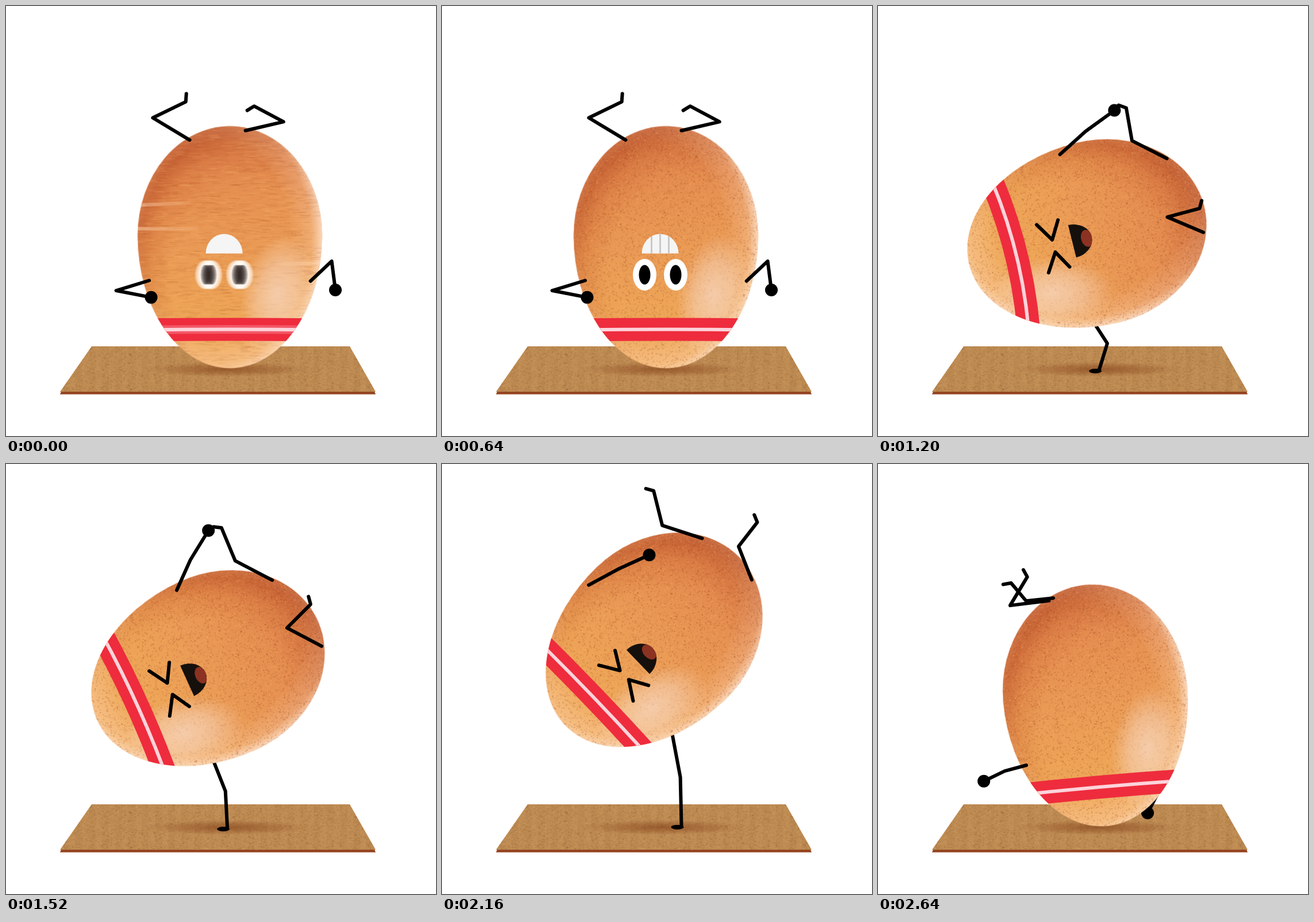
Animation of 748x748 px, one loop 2.72 s. Source, as an HTML page with a canvas:

```html
<!DOCTYPE html>
<html>
<head>
<meta charset="utf-8">
<style>
html, body { margin: 0; width: 100%; height: 100%; overflow: hidden; background: #fff; }
canvas { display: block; }
</style>
</head>
<body>
<canvas id="stage" width="748" height="748"></canvas>
<script>
const SIZE = 748, LOOP = 2720, STEP = 80, SPIN = 320, TAU = Math.PI * 2, DEG = TAU / 360;
const ctx = document.getElementById('stage').getContext('2d');

let seed = 7;
const rnd = () => (seed = seed * 16807 % 2147483647) / 2147483647;
const lerp = (a, b, p) => a + (b - a) * p;
const mixList = (a, b, p) => a.map((v, i) => lerp(v, b[i], p));
const mixAngle = (a, b, p) => a + (((b - a + 540) % 360 + 360) % 360 - 180) * p;

// ---- Cached artwork ----

function layer(w, h, paint) {
  const canvas = document.createElement('canvas');
  canvas.width = w;
  canvas.height = h;
  paint(canvas.getContext('2d'));
  return canvas;
}

function gradient(g, stops) {
  stops.forEach(([at, color]) => g.addColorStop(at, color));
  return g;
}

// The egg is two half ellipses that meet at WAIST; its pointed end is down.
const WAIST = -20, WIDE = 160.5, BLUNT = 190.5, POINTED = 230.5;
const edgeX = y => WIDE * Math.sqrt(1 - ((y - WAIST) / (y < WAIST ? BLUNT : POINTED)) ** 2);
const topY = x => WAIST - BLUNT * Math.sqrt(1 - (x / WIDE) ** 2);

function eggPath(c) {
  c.beginPath();
  c.ellipse(0, WAIST, WIDE, BLUNT, 0, Math.PI, TAU);
  c.ellipse(0, WAIST, WIDE, POINTED, 0, 0, Math.PI);
}

function dots(c, count, x, y, w, h, dw, dh, colors) {
  for (let i = 0; i < count; i++) {
    c.fillStyle = colors[i % colors.length];
    c.fillRect(x + rnd() * w, y + rnd() * h, dw * (.6 + rnd() * .8), dh * (.6 + rnd() * .8));
  }
}

// Spinning smears the speckles sideways.
const makeEgg = spinning => layer(340, 440, c => {
  c.translate(170, 220);
  eggPath(c);
  c.clip();
  const fill = style => { c.fillStyle = style; c.fillRect(-170, -220, 340, 440); };
  fill(gradient(c.createLinearGradient(-20, -211, 20, 211), [
    [0, '#d47846'], [.2, '#e48c50'], [.5, '#ea9a55'], [.8, '#eea657'], [1, '#f2b26c']]));
  c.save();
  c.scale(160, 211);
  fill(gradient(c.createRadialGradient(.2, .25, 0, .2, .25, 1.25), [
    [.66, 'rgba(190,80,35,0)'], [.85, 'rgba(190,80,35,.2)'], [1, 'rgba(175,65,30,.48)']]));
  fill(gradient(c.createRadialGradient(-.14, -.06, 0, -.14, -.06, 1.14), [
    [.7, 'rgba(255,220,190,0)'], [.9, 'rgba(255,220,190,.28)'], [1, 'rgba(255,235,220,.75)']]));
  c.restore();
  if (spinning)
    dots(c, 3200, -170, -212, 330, 424, 15, 1.5, ['rgba(165,75,30,.12)', 'rgba(255,195,115,.12)']);
  else
    dots(c, 11000, -165, -212, 330, 424, 1.6, 1.6, ['rgba(160,70,30,.34)', 'rgba(255,195,110,.24)']);
  c.translate(82, 82);
  c.rotate(.22);
  c.scale(62, 108);
  fill(gradient(c.createRadialGradient(0, 0, 0, 0, 0, 1), [
    [0, 'rgba(248,218,198,.75)'], [.5, 'rgba(248,216,194,.5)'], [1, 'rgba(250,215,190,0)']]));
});

const board = layer(SIZE, SIZE, c => {
  const shape = (color, ...pts) => {
    c.fillStyle = color;
    c.beginPath();
    pts.forEach(p => c.lineTo(...p));
    c.closePath();
    c.fill();
  };
  shape('#94431f', [97, 668], [94, 675.5], [643, 675.5], [640, 668]);
  shape('#bb8850', [149, 592], [598, 592], [643, 671], [94, 671]);
  c.globalCompositeOperation = 'source-atop';
  for (let x = 110; x < 640; x += 23) {
    c.fillStyle = 'rgba(225,175,110,.1)';
    c.fillRect(x, 592, 11, 78);
  }
  dots(c, 6000, 94, 592, 549, 78, 2.5, 1.5, ['rgba(110,60,20,.12)', 'rgba(225,175,115,.14)']);
  c.translate(385, 632);
  c.scale(140, 13);
  c.fillStyle = gradient(c.createRadialGradient(0, 0, 0, 0, 0, 1), [
    [0, 'rgba(125,58,20,.6)'], [.5, 'rgba(130,62,22,.35)'], [1, 'rgba(130,62,22,0)']]);
  c.fillRect(-1, -1, 2, 2);
});

const shell = makeEgg(false), spinShell = makeEgg(true);

// ---- Poses ----
// A swinging limb has a root on the egg's outline, two screen angles and a reach.
const limb = (root, upper, lower, reach = 1) => ({ root, upper, lower, reach });
// The other arm follows its hand: shoulder height, hand x and y, elbow bow.
const FLOOR = [385, 632];

const spinA = {
  body: [389.5, 419.5, 0], face: [-10, 11, 1], bend: 1,
  legs: [limb(-70, -149, -26, 1.1), limb(27, -13, -152)],
  arm: limb(58, 163, 11), prop: [59, 573, 494, 45],
};
const spinB = {
  body: [389.5, 419.5, 0], face: [-38, 31, 1.7], bend: -4,
  legs: [limb(-67, -165, -15, 1.2), limb(16, 8, -142, .8)],
  arm: limb(3, 163, 99, .8), prop: [3, 618, 462, 0],
};
const kick = {
  body: [366, 358, 81], face: [4, 18, 1], bend: 9,
  legs: [limb(-95, -51, 95), limb(46, 40, 34, .55)],
  arm: limb(71, -61, 0, .82), prop: [21, ...FLOOR, 11],
};
const crouch = {
  body: [363, 399, 76], face: [4, 27, 1], bend: 17,
  legs: [limb(-96, -153, -100), limb(44, -157, -15)],
  arm: limb(11, -42, -36), prop: [26, ...FLOOR, 20],
};
const stretch = {
  body: [345, 342, 61], face: [1, 45, 1], bend: 4,
  legs: [limb(-96, -152, -118, 1.1), limb(44, -150, -58)],
  arm: limb(-18, -76, -68, .95), prop: [68, ...FLOOR, 6],
};
const land = {
  body: [421, 421, 8], face: [27, 37, 1], bend: 0,
  legs: [limb(-2, -188, -68), limb(36, -12, -37, .7)],
  arm: limb(90, 95, 88), prop: [120, 498, 620, 9],
};
const wind = {
  body: [379.5, 420, -5], face: [-10, 20, 1], bend: 2,
  legs: [limb(-58, -186, -130, .7), limb(-66, -187, -59)],
  arm: limb(93, 165, 154, .65), prop: [150, 469, 607, 0],
};

const mixLimb = (a, b, p) => limb(lerp(a.root, b.root, p),
  mixAngle(a.upper, b.upper, p), mixAngle(a.lower, b.lower, p), lerp(a.reach, b.reach, p));

const mix = (a, b, p) => ({
  body: mixList(a.body, b.body, p),
  face: mixList(a.face, b.face, p),
  bend: lerp(a.bend, b.bend, p),
  legs: a.legs.map((leg, i) => mixLimb(leg, b.legs[i], p)),
  arm: mixLimb(a.arm, b.arm, p),
  prop: mixList(a.prop, b.prop, p),
});

const held = mix(crouch, stretch, .7);
const keys = [[0, spinA], [SPIN, spinB], [640, spinA], [880, kick], [1200, crouch], [1520, held],
  [1840, held], [1920, stretch], [2320, land], [2640, wind], [LOOP, spinA]];

function poseAt(t) {
  const i = keys.findIndex(k => k[0] > t) - 1;
  const [start, from] = keys[i], [stop, to] = keys[i + 1];
  const p = (t - start) / (stop - start), arc = Math.sin(p * Math.PI);
  const pose = mix(from, to, start === 1920 ? p ** 2.5 : p * p * (3 - 2 * p));
  if (start === 640 || start === 1920) pose.body[1] -= 58 * arc;
  if (t < 880) pose.legs.forEach(leg => leg.reach *= 1 + .8 * arc ** 2);
  return pose;
}

function toWorld([x, y], [cx, cy, tilt]) {
  const c = Math.cos(tilt * DEG), s = Math.sin(tilt * DEG);
  return [cx + x * c - y * s, cy + x * s + y * c];
}

// Joint positions from a start point and a list of [angle, length].
function chain(start, ...bones) {
  const pts = [start];
  bones.forEach(([angle, length]) => {
    const [x, y] = pts[pts.length - 1];
    pts.push([x + length * Math.cos(angle * DEG), y + length * Math.sin(angle * DEG)]);
  });
  return pts;
}

const shoulder = (side, y, body) => toWorld([side * .93 * edgeX(y), y], body);

const legPoints = ({ root, upper, lower, reach }, body) =>
  chain(toWorld([root, topY(root) + 5], body), [upper, 68 * reach], [lower, 58 * reach], [lower - 60, 14]);

const armPoints = ({ root, upper, lower, reach }, body) =>
  chain(shoulder(-1, root, body), [upper, 60 * reach], [lower, 62 * reach]);

function propPoints([root, x, y, bow], body) {
  const [sx, sy] = shoulder(1, root, body);
  const dx = x - sx, dy = y - sy, k = bow / Math.hypot(dx, dy);
  return [[sx, sy], [(sx + x) / 2 + dy * k, (sy + y) / 2 - dx * k], [x, y]];
}

// ---- Drawing ----

function line(pts, color = '#000', width = 6) {
  ctx.strokeStyle = color;
  ctx.lineWidth = width;
  ctx.beginPath();
  pts.forEach(p => ctx.lineTo(...p));
  ctx.stroke();
}

function oval(x, y, rx, ry, color) {
  ctx.fillStyle = color;
  ctx.beginPath();
  ctx.ellipse(x, y, rx, ry, 0, 0, TAU);
  ctx.fill();
}

function mouth(w, h, color) {
  ctx.fillStyle = color;
  ctx.beginPath();
  ctx.ellipse(0, 0, w, h, 0, Math.PI, TAU);
  ctx.closePath();
  ctx.fill();
}

// A hand is a ball in the air and flat on the floor.
function drawArm(pts) {
  line(pts);
  const [x, y] = pts[2];
  y > 608 ? oval(x - 7, y + 3, 11, 4, '#000') : oval(x, y, 11, 11, '#000');
}

function grinFace(blurred) {
  const smear = paint => {
    if (!blurred) return paint();
    ctx.globalAlpha = .28;
    for (let dx = -7; dx <= 7; dx += 1.75) {
      ctx.save();
      ctx.translate(dx, 0);
      paint();
      ctx.restore();
    }
    ctx.globalAlpha = 1;
  };
  const eyes = (rx, ry, color) => [-27, 27].forEach(x => oval(x, 37, rx, ry, color));
  mouth(32, 34, '#f5f5f5');
  if (!blurred) {
    ctx.save();
    ctx.clip();
    [-15, 0, 15].forEach(x => line([[x, -36], [x, 0]], '#c6c6c6', 2.8));
    ctx.restore();
  }
  smear(() => eyes(blurred ? 17 : 20.5, blurred ? 25 : 27.5, '#fff'));
  smear(() => eyes(blurred ? 7 : 10, 17, blurred ? '#241c18' : '#000'));
}

function shoutFace() {
  [-1, 1].forEach(s => line([[43 * s, 53], [11 * s, 33], [42 * s, 15]]));
  ctx.save();
  mouth(29, 35, '#15100c');
  ctx.clip();
  oval(1, -26, 15, 10, '#8c3222');
  ctx.restore();
}

function streak(x1, y1, x2, y2) {
  const fade = gradient(ctx.createLinearGradient(x1, y1, x2, y2),
    [[0, 'rgba(255,215,180,.5)'], [1, 'rgba(255,215,180,.1)']]);
  line([[x1, y1], [x2, y2]], fade);
}

function drawBand(y, bend, color, width) {
  ctx.strokeStyle = color;
  ctx.lineWidth = width;
  ctx.beginPath();
  ctx.moveTo(-170, y);
  ctx.quadraticCurveTo(0, y - 2 * bend, 170, y);
  ctx.stroke();
}

function drawBody(t, { body: [x, y, tilt], face: [faceX, faceY, wide], bend }) {
  const spinning = t < 640;
  const turn = spinning ? t * TAU / SPIN : t > 2320 ? Math.PI * ((t - 2320) / SPIN) ** 2 : 0;
  const front = Math.cos(turn), smear = wide - 1;
  ctx.save();
  ctx.translate(x, y);
  ctx.rotate(tilt * DEG);
  ctx.drawImage(spinning ? spinShell : shell, -170, -220);
  eggPath(ctx);
  ctx.clip();
  if (spinning) {
    streak(-160, -73, -72 - 23 * smear, -77);
    streak(-160, -32, -57 + 139 * smear, -32 - 31 * smear);
    streak(157 - 36 * smear, 28 + 94 * smear, 85 - 121 * smear, 29 + 103 * smear);
  }
  drawBand(144, bend, '#ee2c3d', 40);
  if (spinning) drawBand(144, bend, 'rgba(255,190,200,.3)', 15);
  drawBand(144, bend, '#fdd3da', 6);
  if (front > .05) {
    ctx.translate(faceX * front - 150 * Math.sin(turn), faceY);
    ctx.transform(wide * Math.max(.3, front), 0, smear, wide ** -.67, 0, 0);
    t >= 720 && t < 2240 ? shoutFace() : grinFace(spinning);
  }
  ctx.restore();
}

function draw() {
  const t = Math.floor(performance.now() % LOOP / STEP) * STEP;
  const pose = poseAt(t), { body } = pose;
  const fold = t < 640 ? Math.cos(t * TAU / SPIN) : 1;
  const turned = pts => pts.map(([x, y]) => [body[0] + (x - body[0]) * fold, y]);
  const prop = turned(propPoints(pose.prop, body));
  const behind = t >= 720;

  ctx.clearRect(0, 0, SIZE, SIZE);
  ctx.lineCap = ctx.lineJoin = 'round';
  ctx.drawImage(board, 0, 0);
  if (behind) drawArm(prop);
  drawBody(t, pose);
  if (!behind) drawArm(prop);
  pose.legs.forEach(leg => line(turned(legPoints(leg, body))));
  drawArm(turned(armPoints(pose.arm, body)));
  requestAnimationFrame(draw);
}
draw();
</script>
</body>
</html>
```
